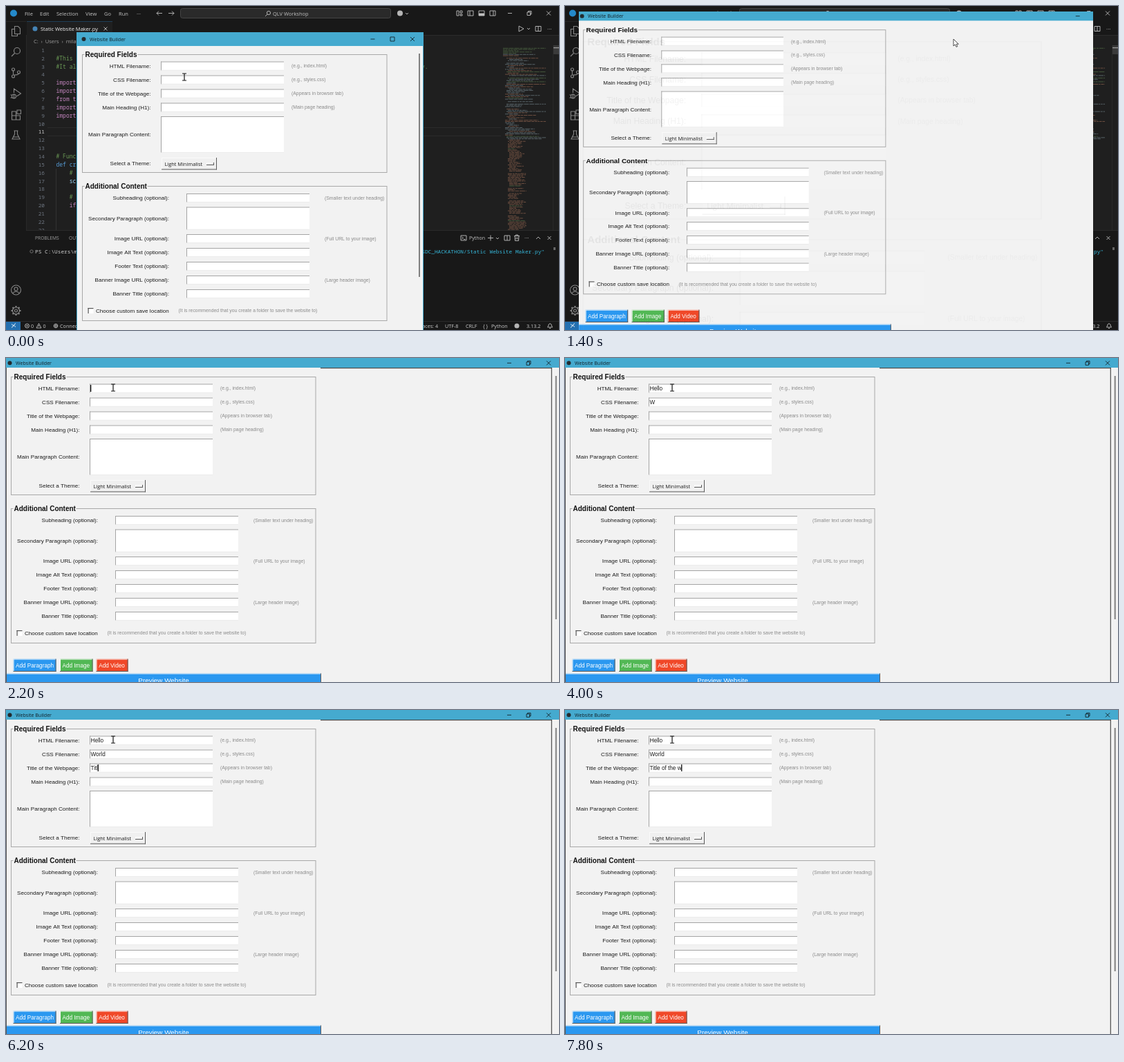
Recreate the animation shown at these times as an HTML page with a canvas. Size 800 by 470 pixels, loop 8 s.

```html
<!DOCTYPE html>
<html lang="en">
<head>
<meta charset="utf-8">
<title>Website Builder</title>
<style>
html, body { margin: 0; width: 100%; height: 100%; overflow: hidden; background: #181818; }
canvas { display: block; }
</style>
</head>
<body>
<canvas id="stage" width="800" height="470"></canvas>
<script>
const LOOP = 8000, STEP = 200;
const ctx = document.getElementById('stage').getContext('2d');
const ARIAL = '"Liberation Sans", Arial, sans-serif';
const UI = '"Open Sans", "Noto Sans", sans-serif';
const MONO = '"Noto Sans Mono", "DejaVu Sans Mono", monospace';

function box(x, y, w, h, color) {
  ctx.fillStyle = color;
  ctx.fillRect(x, y, w, h);
}

function frame(x, y, w, h, color) {
  ctx.strokeStyle = color;
  ctx.lineWidth = 1;
  ctx.strokeRect(x, y, w, h);
}

function dot(x, y, r, color) {
  ctx.fillStyle = color;
  ctx.beginPath();
  ctx.arc(x, y, r, 0, 7);
  ctx.fill();
}

// Text is placed by the middle of its cap height.
function text(str, x, y, size, color, family = ARIAL, align = 'left', weight = '') {
  ctx.font = `${weight} ${size}px ${family}`;
  ctx.fillStyle = color;
  ctx.textAlign = align;
  ctx.fillText(str, x, y + size * 0.36);
}

function icon(x, y, d, color = '#c0c0c0', width = 0.9) {
  ctx.save();
  ctx.translate(x, y);
  ctx.strokeStyle = color;
  ctx.lineWidth = width;
  ctx.stroke(new Path2D(d));
  ctx.restore();
}

const circle = r => `M${r} 0A${r} ${r} 0 1 1 ${-r} 0A${r} ${r} 0 1 1 ${r} 0`;
const square = (w, h = w) => `M${-w / 2} ${-h / 2}h${w}v${h}h${-w}z`;
const CROSS = 'M-3 -3L3 3M3 -3L-3 3';
const DASH = 'M-3 0H3';
const RESTORE = 'M-3 -1.5H1.5V3H-3zM-1.5 -1.5V-3H3V1.5H1.5';
const CHEVRON = 'M-2 -1L0 1L2 -1';
const SPLIT = square(8, 7) + 'M0 -3.5V3.5';
const ARROW = 'M0 0V10L2.4 7.8L4 11.4L5.8 10.6L4.2 7.2H7.3z';
const IBEAM = 'M-3 -5H3M0 -5V5M-3 5H3';

/* ---------- code editor behind the window ---------- */

const CODE = {
  2: '#This', 3: '#It al', 5: 'import', 6: 'import', 7: 'from t', 8: 'import', 9: 'import',
  14: '# Func', 15: 'def cr', 16: '    #', 17: '    sc', 19: '    #', 20: '    if'
};

function codeColor(line) {
  const word = line.trim();
  if (word[0] === '#') return '#6a9955';
  if (word.startsWith('def')) return '#569cd6';
  return word === 'sc' ? '#9cdcfe' : '#c586c0';
}

function random(seed) {
  return () => (seed = seed * 16807 % 2147483647) / 2147483647;
}

function drawMinimap() {
  const rnd = random(41);
  ctx.globalAlpha = 0.55;
  for (let y = 59; y < 324; y += 1.8) {
    const lower = y > 193;
    const a = rnd(), b = rnd(), c = rnd();
    if (a < 0.08) continue;
    const indent = y < 72 ? 0 : lower ? 7 + Math.floor(b * 2) * 2 : 3 + Math.floor(b * 4) * 2;
    const length = lower ? 10 + c * 17 : c > 0.8 ? 62 - indent : 10 + c * 50;
    const color = y < 69 || a > 0.96 ? '#5f8050' : lower || a < 0.4 ? '#a9745a' : '#8497a0';
    for (let x = 0; x < length; ) {
      const run = Math.min(2 + rnd() * 6, length - x);
      box(719 + indent + x, y, run, 1, color);
      x += run + 0.9;
    }
  }
  ctx.globalAlpha = 1;
}

function drawActivityBar() {
  const gray = '#868686';
  icon(14.5, 36.5, 'M-2 -7H3L6 -4V4H-2zM-2 -3H-6V7H2V4', gray, 1.1);
  icon(16, 65, circle(4.5) + 'M-3 3L-8 8', gray, 1.2);
  icon(14.5, 97, 'M-2 -5A2 2 0 1 1 -6 -5A2 2 0 1 1 -2 -5M-2 5A2 2 0 1 1 -6 5A2 2 0 1 1 -2 5' +
    'M6 -1A2 2 0 1 1 2 -1A2 2 0 1 1 6 -1M-4 -3V3M4 1Q4 3 -3 3', gray, 1.1);
  icon(14.5, 127, 'M-3 -1V-7L7 0L1 4M0 4A3 3 0 1 1 -6 4A3 3 0 1 1 0 4M-8 2H-6M-8 6H-6M-3 1V7', gray, 1.1);
  icon(14.5, 158, 'M-6 -5H0V7H-6zM-6 1H6V7H0M1.5 -7H7V-1.5H1.5z', gray, 1.1);
  icon(14.5, 187, 'M-3 -6H3M-2 -6V-1L-5.5 6H5.5L2 -1V-6M-4 3H4', gray, 1.1);
  icon(14.5, 412, circle(7) + 'M2.5 -1.5A2.5 2.5 0 1 1 -2.5 -1.5A2.5 2.5 0 1 1 2.5 -1.5M-5 5Q0 -1 5 5', gray, 1.1);
  icon(14.5, 442, circle(5) + circle(2), gray, 1.2);
  for (let i = 0; i < 8; i++) {
    const c = Math.cos(i * Math.PI / 4), s = Math.sin(i * Math.PI / 4);
    icon(14.5, 442, `M${5 * c} ${5 * s}L${7 * c} ${7 * s}`, gray, 2);
  }
}

function drawEditorHeader() {
  dot(11, 10.5, 5, '#2489ca');
  const menus = { File: 27, Edit: 49, Selection: 73, View: 115, Go: 142, Run: 163, '···': 189 };
  for (const name in menus) text(name, menus[name], 11, 7.5, '#c4c4c4', UI);
  icon(222, 10.5, 'M4 0H-4M-1 -3L-4 0L-1 3');
  icon(239, 10.5, 'M-4 0H4M1 -3L4 0L1 3');
  ctx.beginPath();
  ctx.roundRect(252.5, 3.5, 304, 14, 3);
  ctx.fillStyle = '#2a2a2a';
  ctx.fill();
  ctx.strokeStyle = '#454545';
  ctx.lineWidth = 1;
  ctx.stroke();
  icon(380, 10, circle(2.6) + 'M-2 2L-5 5');
  text('QLV Workshop', 386, 11, 7.5, '#c0c0c0', UI);
  dot(570, 10.5, 4, '#b5b5b5');
  icon(580, 11, CHEVRON);
  icon(656, 10.5, 'M-4 -3.5H-1V3.5H-4zM1 -3.5H4V-.5H1zM1 1.5H4V3.5H1z');
  icon(672, 10.5, square(8, 7) + 'M-1 -3.5V3.5');
  icon(688, 10.5, square(8, 7));
  box(684, 10.5, 8, 3.5, '#c0c0c0');
  icon(704, 10.5, square(8, 7) + 'M1 -3.5V3.5');
  icon(729, 10.5, DASH);
  icon(757, 10.5, RESTORE);
  icon(785, 10.5, CROSS);

  box(29, 22, 771, 21, '#181818');
  box(29, 42, 771, 1, '#2b2b2b');
  box(30, 22, 124, 21, '#1f1f1f');
  box(30, 22, 124, 1, '#1f3f58');
  dot(42, 33, 3.5, '#4584b6');
  text('Static Website Maker.py', 50, 33, 7.5, '#f0f0f0', UI);
  icon(144, 33, 'M-2.5 -2.5L2.5 2.5M2.5 -2.5L-2.5 2.5');
  icon(745, 33, 'M-3 -4L4 0L-3 4z');
  icon(756, 33, CHEVRON);
  icon(770, 33, SPLIT);
  text('···', 783, 33, 8, '#c0c0c0', UI);
}

function drawCode() {
  text('C:  ›  Users  ›  mila', 40, 51, 7.5, '#9d9d9d', UI);
  box(60, 176, 656, 1, '#2b2b2b');
  box(60, 188, 656, 1, '#2b2b2b');
  box(72, 236, 0.6, 89, '#404040');
  for (let n = 1; n <= 23; n++) {
    const y = 64 + (n - 1) * 11.86;
    text(n, 56, y, 7.8, n === 11 ? '#cccccc' : '#6e7681', MONO, 'right');
    if (CODE[n]) text(CODE[n], 72.5, y, 8, codeColor(CODE[n]), MONO);
  }
  text('y.', 601, 87.7, 8, '#6a9955', MONO);
  drawMinimap();
  box(791, 57, 0.6, 268, '#303030');
  box(792, 57, 8, 13, '#3a3a3a');
  box(792, 60, 8, 1.2, '#a0a0a0');
}

function drawPanel() {
  box(29, 325, 771, 133, '#181818');
  box(29, 325, 771, 1, '#2b2b2b');
  text('PROBLEMS', 42, 336.5, 6.7, '#9d9d9d', UI);
  text('OUTPUT', 91, 336.5, 6.7, '#9d9d9d', UI);
  icon(662, 336.5, square(8, 7) + 'M-2.5 -1.5L-.5 0L-2.5 1.5M0 2H2.5');
  text('Python', 670, 336.5, 7, '#c4c4c4', UI);
  icon(701, 336.5, 'M-4 0H4M0 -4V4');
  icon(711, 337, CHEVRON);
  icon(725, 336.5, SPLIT);
  icon(739, 336.5, 'M-4 -3H4M-1.5 -3V-4.5H1.5V-3M-3 -3L-2.5 4H2.5L3 -3M-1 -1V2M1 -1V2');
  text('···', 750, 336.5, 8, '#c0c0c0', UI);
  icon(770, 336.5, 'M-3 1.5L0 -1.5L3 1.5');
  icon(786, 336.5, 'M-2.5 -2.5L2.5 2.5M2.5 -2.5L-2.5 2.5');
  icon(37, 356, circle(2.2), '#777777');
  text('PS C:\\Users\\mila', 42, 356, 7.8, '#cccccc', MONO);
  text('SDC_HACKATHON/Static Website Maker.py"', 779, 356, 7.8, '#35b4d6', MONO, 'right');
  box(792, 350, 3, 4, '#656565');
}

function drawStatusBar() {
  box(0, 457, 800, 13, '#181818');
  box(0, 457, 800, 1, '#2b2b2b');
  box(0, 458, 21, 12, '#2470b0');
  icon(11, 464, 'M-3 -2.5L0 0L-3 2.5M3 -3.5L0 -1L3 1.5', '#ffffff');
  const status = (str, x, align) => text(str, x, 464, 7.2, '#cccccc', UI, align);
  icon(30.5, 464, circle(3) + 'M-1.3 -1.3L1.3 1.3M1.3 -1.3L-1.3 1.3');
  status('0', 36);
  icon(47.5, 464, 'M0 -3.5L3.5 3H-3.5zM0 -1V1');
  status('0', 53.5);
  icon(72, 464, circle(2.8) + 'M0 -2.8V2.8M-2.8 0H2.8');
  status('Connect', 78);
  status('Spaces: 4', 625, 'right');
  status('UTF-8', 635);
  status('CRLF', 665);
  status('{ }', 690);
  status('Python', 702);
  dot(739, 464, 3.5, '#b5b5b5');
  status('3.13.2', 753);
  icon(787, 464, 'M-3.5 2Q-2 0 -2 -2Q0 -5 2 -2Q2 0 3.5 2zM-1 3.5H1');
}

function drawEditor() {
  box(0, 0, 800, 470, '#181818');
  box(29, 43, 771, 282, '#1f1f1f');
  box(29, 22, 0.8, 436, '#2b2b2b');
  box(0, 22, 800, 0.8, '#2b2b2b');
  drawEditorHeader();
  drawActivityBar();
  drawCode();
  drawPanel();
  drawStatusBar();
}

/* ---------- form window ---------- */

const FIELDS = [
  ['HTML Filename:', 44, '(e.g., index.html)'],
  ['CSS Filename:', 64, '(e.g., styles.css)'],
  ['Title of the Webpage:', 84, '(Appears in browser tab)'],
  ['Main Heading (H1):', 104, '(Main page heading)'],
  ['Main Paragraph Content:', 143.5, '', 53]
];
const EXTRAS = [
  ['Subheading (optional):', 235.5, '(Smaller text under heading)'],
  ['Secondary Paragraph (optional):', 265, '', 33],
  ['Image URL (optional):', 294.5, '(Full URL to your image)'],
  ['Image Alt Text (optional):', 314.5],
  ['Footer Text (optional):', 334.5],
  ['Banner Image URL (optional):', 354.5, '(Large header image)'],
  ['Banner Title (optional):', 374.5]
];
const HINT = '#8a8a8a';
const HINT_SIZE = 6.85;

function drawGroup(title, y, h, width) {
  frame(7.5, y, 440.5, h, '#a8a8a8');
  box(10.5, y - 5, width, 10, '#f2f2f2');
  text(title, 11.5, y, 10, '#111111', ARIAL, 'left', 'bold');
}

function drawRows(rows, labelX, fieldX, hintX) {
  for (const [label, y, hint = '', h = 13] of rows) {
    const top = y - h / 2;
    text(label, labelX, y, 8.1, '#1c1c1c', ARIAL, 'right');
    box(fieldX, top, 178, h, '#ffffff');
    box(fieldX, top, 178, 1, '#a4a4a4');
    box(fieldX, top, 1, h, '#a4a4a4');
    box(fieldX, top + h - 0.7, 178, 0.7, '#e4e4e4');
    text(hint, hintX, y, HINT_SIZE, HINT);
  }
}

function drawRaised(x, y, w, h, color) {
  box(x, y, w, h, color);
  box(x, y, w, 1, '#fafafa');
  box(x, y, 1, h, '#fafafa');
  box(x, y + h - 1, w, 1, '#5a5a5a');
  box(x + w - 1, y, 1, h, '#5a5a5a');
}

function drawForm() {
  drawGroup('Required Fields', 27.5, 171, 77);
  drawRows(FIELDS, 106.5, 121, 310);
  text('Select a Theme:', 106.5, 185.5, 8.1, '#1c1c1c', ARIAL, 'right');
  drawRaised(122, 177, 80, 17.5, '#f0f0f0');
  text('Light Minimalist', 126.5, 186, 7.4, '#1c1c1c', UI);
  drawRaised(187, 184, 11, 4, '#f0f0f0');

  drawGroup('Additional Content', 218.5, 195, 91);
  drawRows(EXTRAS, 133, 158, 358);
  box(15.5, 395, 8, 8, '#ffffff');
  box(15.5, 395, 8, 1.2, '#555555');
  box(15.5, 395, 1.2, 8, '#555555');
  text('Choose custom save location', 27, 399, 8.1, '#1c1c1c');
  text('(It is recommended that you create a folder to save the website to)', 146.5, 399, HINT_SIZE, HINT);

  drawRaised(10.5, 436.5, 62, 18.5, '#2b98f0');
  drawRaised(78, 436.5, 47.5, 18.5, '#52b855');
  drawRaised(130.5, 436.5, 46, 18.5, '#f04828');
  text('Add Paragraph', 41.5, 446, 8.2, '#ffffff', ARIAL, 'center');
  text('Add Image', 101.3, 446, 8.2, '#ffffff', ARIAL, 'center');
  text('Add Video', 153, 446, 8.2, '#ffffff', ARIAL, 'center');
  drawRaised(0, 457.5, 456, 20, '#2b98f0');
  text('Preview Website', 228, 467.5, 9.9, '#ffffff', ARIAL, 'center');
}

function drawTitle(x, y, buttons, restore) {
  dot(x - 8.5, y, 3, '#242c30');
  text('Website Builder', x, y, 7.1, '#14232a', UI);
  icon(buttons[0], y, DASH, '#14232a');
  icon(buttons[1], y, restore ? RESTORE : square(6), '#14232a');
  icon(buttons[2], y, CROSS, '#14232a');
}

function transformed(x, y, scale, draw) {
  ctx.save();
  ctx.translate(x, y);
  ctx.scale(scale, scale);
  draw();
  ctx.restore();
}

function drawRestoredWindow(pressed) {
  box(102, 38, 502, 432, '#45aacf');
  box(103, 58, 500, 412, '#f2f2f2');
  drawTitle(pressed ? 116.5 : 121, 48, [530.5, 559, 588], pressed);
  transformed(103, 43, 1, drawForm);
  box(597, 69, 2, 324, '#808080');
}

function drawMaximizedWindow() {
  box(0, 0, 800, 470, '#f2f2f2');
  box(0, 0, 800, 14, '#45aacf');
  drawTitle(14, 7.3, [728, 756, 785], true);
  drawForm();
}

function drawGrowingWindow() {
  ctx.save();
  ctx.beginPath();
  ctx.rect(20, 8, 744, 462);
  ctx.clip();
  transformed(19.2, 7.4, 0.9925, drawMaximizedWindow);
  ctx.globalAlpha = 0.06;
  transformed(15, 10.4, 1.504, drawForm);
  ctx.restore();
}

/* ---------- motion ---------- */

const TYPING = [
  { str: 'Hello', y: 44, focus: 2200, start: 2800, pace: 150 },
  { str: 'World', y: 64, focus: 3400, start: 4000, pace: 200 },
  { str: 'Title of the w', y: 84, focus: 5000, start: 5600, pace: 168 }
];

function drawTyping(t) {
  const active = TYPING.findLast(f => t >= f.focus);
  for (const field of TYPING) {
    const count = Math.max(0, Math.floor((t - field.start) / field.pace) + 1);
    const typed = field.str.slice(0, count);
    text(typed, 122.5, field.y, 8.2, '#1c1c1c');
    if (field === active && (t - field.focus) % 900 < 600) {
      box(122 + ctx.measureText(typed).width, field.y - 5, 1.3, 10, '#111111');
    }
  }
}

function ease(t, from, to) {
  const p = Math.min(1, Math.max(0, (t - from) / (to - from)));
  return p * p * (3 - 2 * p);
}

function drawPointer(t) {
  const out = ease(t, 0, 1200), back = ease(t, 1400, 2200);
  const x = 258 + 304 * out - 407 * back;
  const y = 103 - 55 * out - 5 * back;
  if (t < 400 || t > 1600 && x < 299) {
    icon(x, y, IBEAM, '#151515', 1.2);
    return;
  }
  transformed(x, y, 1, () => {
    ctx.fillStyle = '#ffffff';
    ctx.fill(new Path2D(ARROW));
  });
  icon(x, y, ARROW, '#222222', 0.8);
}

function draw(t) {
  if (t < 1600) {
    drawEditor();
    if (t < 1400) drawRestoredWindow(t >= 1200);
    else drawGrowingWindow();
  } else {
    drawMaximizedWindow();
    box(0, 14, 1, 456, '#555555');
    box(455, 14, 335, 1.2, '#4a4a4a');
    box(788.7, 14, 1.2, 456, '#4a4a4a');
    box(794.7, 26, 2, 353, '#808080');
    drawTyping(t);
  }
  drawPointer(t);
}

function tick() {
  const t = performance.now() % LOOP;
  draw(Math.floor(t / STEP) * STEP);
  requestAnimationFrame(tick);
}
tick();
</script>
</body>
</html>
```
